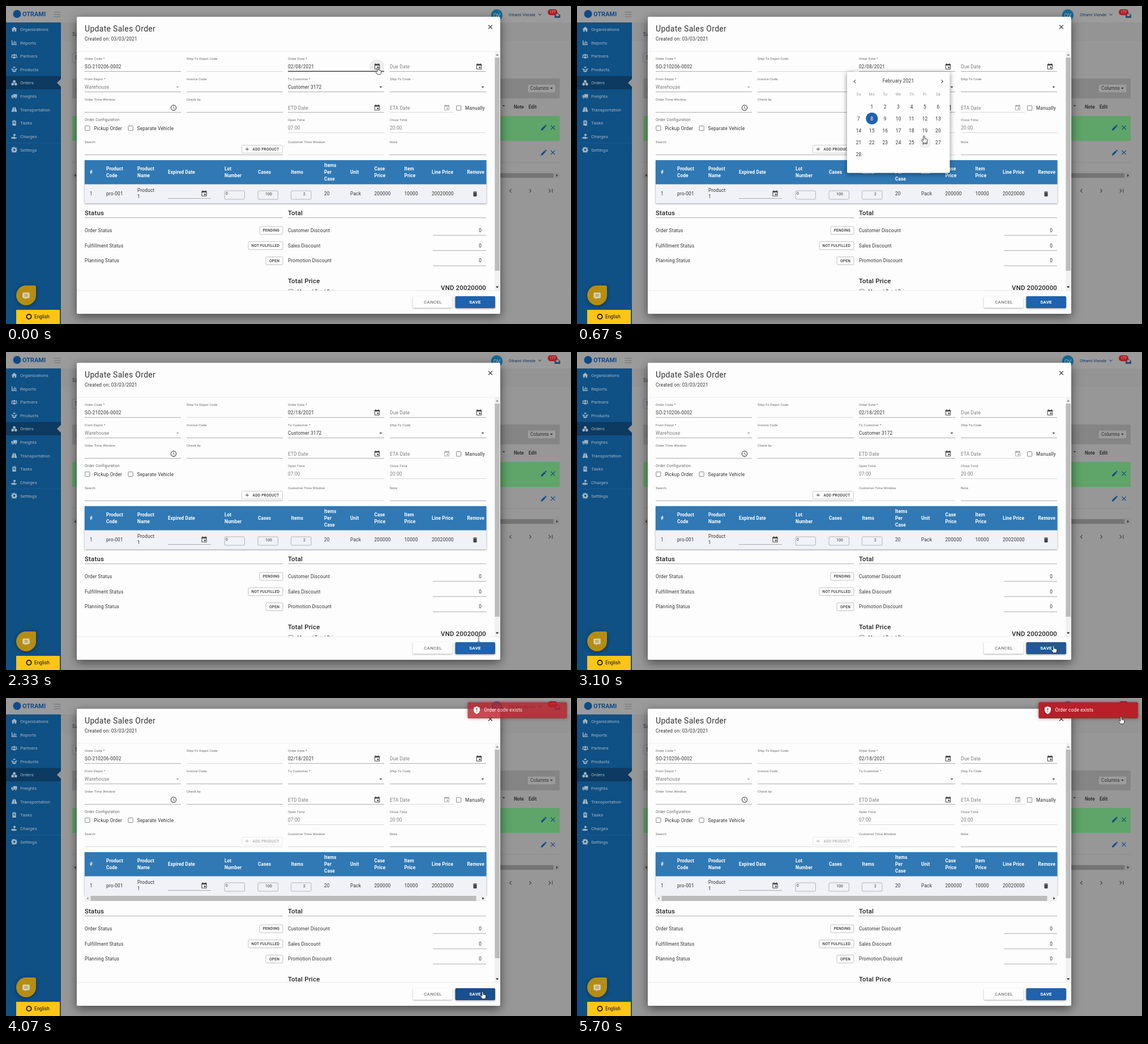
Write an HTML page that moves like this. It is 998 px wide and 561 px high and loops after 5.73 s.

```html
<!DOCTYPE html>
<html lang="en">
<head>
<meta charset="utf-8">
<title>Update Sales Order</title>
<style>
html, body { margin: 0; width: 100%; height: 100%; overflow: hidden; background: #999; }
svg { display: block; width: 998px; height: 561px; }
text { font-family: Roboto, sans-serif; font-size: 8.3px; letter-spacing: .2px; fill: #333; white-space: pre; }
.side text, .top text { letter-spacing: 0; }
.lb { font-size: 5.9px; letter-spacing: .15px; fill: #666; }
.sm { font-size: 6.7px; letter-spacing: .18px; fill: #666; }
.btn { font-size: 6.5px; letter-spacing: .3px; font-weight: 500; }
.th { font-size: 8.2px; letter-spacing: .12px; font-weight: 700; fill: #fff; }
.h { font-size: 11.4px; font-weight: 500; fill: #222; }
.gray { fill: #7c7c7c; }
.in { font-size: 6.8px; }
.big { font-size: 8px; letter-spacing: .25px; font-weight: 500; }
</style>
</head>
<body>
<svg id="stage" viewBox="0 0 998 561"></svg>
<script>
const LOOP = 5730;
const SHAPES = {
  event: 'M17 12h-5v5h5zM16 1v2H8V1H6v2H5a2 2 0 0 0-2 2v14a2 2 0 0 0 2 2h14a2 2 0 0 0 2-2V5a2 2 0 0 0-2-2h-1V1zm3 18H5V8h14z',
  clock: 'M12 2a10 10 0 1 0 0 20 10 10 0 0 0 0-20zm0 2.2a7.8 7.8 0 1 1 0 15.6 7.8 7.8 0 0 1 0-15.6zM11 7v6l5 3 .8-1.3-4.2-2.5V7z',
  bin: 'M6 19a2 2 0 0 0 2 2h8a2 2 0 0 0 2-2V7H6zM19 4h-3.5l-1-1h-5l-1 1H5v2h14z',
  pen: 'M3 17.25V21h3.75L17.8 9.94l-3.75-3.75zM20.7 7.04a1 1 0 0 0 0-1.41l-2.34-2.34a1 1 0 0 0-1.41 0l-1.83 1.83 3.75 3.75z',
  down: 'M7 10l5 5 5-5z',
  close: 'M19 6.4L17.6 5 12 10.6 6.4 5 5 6.4l5.6 5.6L5 17.6 6.4 19l5.6-5.6 5.6 5.6 1.4-1.4-5.6-5.6z',
  plus: 'M19 13h-6v6h-2v-6H5v-2h6V5h2v6h6z',
  left: 'M15.4 7.4L14 6l-6 6 6 6 1.4-1.4L10.8 12z',
  right: 'M8.6 16.6L13.2 12 8.6 7.4 10 6l6 6-6 6z',
  last: 'M5.6 7.4L10.2 12l-4.6 4.6L7 18l6-6-6-6zM16 6h2v12h-2z',
  chat: 'M5 3h14a3 3 0 0 1 3 3v10a3 3 0 0 1-3 3h-5l-5 3v-3H5a3 3 0 0 1-3-3V6a3 3 0 0 1 3-3zm2 5v2h10V8zm0 4v2h10v-2z',
  shield: 'M12 1L3 4.5V11c0 5.500 3.800 10 9 12 5.200-2 9-6.500 9-12V4.500zM10.800 6h2.500v7h-2.500zm0 9h2.500v2.500h-2.500z',
  home: 'M12 2L1 12h3v9h6v-6h4v6h6v-9h3z',
  chart: 'M2 3h3v15h17v3H2zM7 11h3v5H7zM12 6h3v10h-3zM17 9h3v7h-3z',
  people: 'M12 4a4 4 0 1 1 0 8 4 4 0 0 1 0-8zM4.500 6a3 3 0 1 1 0 6 3 3 0 0 1 0-6zm15 0a3 3 0 1 1 0 6 3 3 0 0 1 0-6zM6 21v-3c0-6 12-6 12 0v3zM0 18c0-5 3-5 5-4.500V18zm24 0c0-5-3-5-5-4.500V18z',
  box: 'M12 1L6 4l6 3 6-3zM1 8l10 4-2 4-8-4zM23 8l-10 4 2 4 8-4zM4 15l6 3 2-3 2 3 6-3v4l-8 4-8-4z',
  cubes: 'M12 1l5 3v6l-5 3-5-3V4zM6 11l5 3v6l-5 3-5-3v-6zM18 11l5 3v6l-5 3-5-3v-6z',
  truck: 'M8 4h15v13H8zM1 8h6v9H1zM6 15a3 3 0 1 1 0 6 3 3 0 0 1 0-6zm12 0a3 3 0 1 1 0 6 3 3 0 0 1 0-6z',
  road: 'M7 3h4v4h2V3h4l6 18H13v-5h-2v5H1zM11 9v4h2V9z',
  tasks: 'M5 3h14v19H5zM9 1h6v3H9zM8 8v2h8V8zm0 4v2h8v-2z',
  coin: 'M1 15h5l5-2h4v3h7v3l-9 3-7-1H1zM13 2a4.500 4.500 0 1 1 0 9 4.500 4.500 0 0 1 0-9z',
  gear: 'M10 1h4l.6 3 2.200 1 2.600-1.700 2.800 2.800L20.500 9l.8 2 2.700 1v3l-3 1-1 2 1.500 2.700-2.800 2.200L16 21l-2 2h-4l-2-2-3 1.500-2.600-2.300L4 17l-1-2-3-1v-4l3-1 1-2-1.500-2.700L5 2l3 2zm2 7a4 4 0 1 0 0 8 4 4 0 0 0 0-8z',
  mail: 'M1 10l11-8 11 8v12H1zm3 1l8 5 8-5-8-6z'
};

const text = (x, y, s, cls = '', more = '') => `<text x="${x}" y="${y}" class="${cls}" ${more}>${s}</text>`;
const rect = (x, y, w, h, fill, more = '') => `<rect x="${x}" y="${y}" width="${w}" height="${h}" fill="${fill}" ${more}/>`;
const line = (x1, x2, y, color = '#8c8c8c', w = .7) => rect(x1, y - w / 2, x2 - x1, w, color);
const disc = (x, y, r, fill, more = '') => `<circle cx="${x}" cy="${y}" r="${r}" fill="${fill}" ${more}/>`;
const path = (d, fill, more = '') => `<path d="${d}" fill="${fill}" ${more}/>`;
const icon = (name, x, y, size = 12.5, fill = '#444') =>
  path(SHAPES[name], fill, `fill-rule="evenodd" transform="translate(${x - size / 2} ${y - size / 2}) scale(${size / 24})"`);
const group = (id, body, more = '') => `<g id="${id}" ${more}>${body}</g>`;
const box = (x, y, w, h, color = '#aaa', r = 2) => rect(x, y, w, h, 'none', `rx="${r}" stroke="${color}" stroke-width=".7"`);
const END = 'text-anchor="end"', MID = 'text-anchor="middle"';

function page() {
  const nav = ['home Organizations', 'chart Reports', 'people Partners', 'box Products', 'cubes Orders', 'truck Freights',
    'road Transportation', 'tasks Tasks', 'coin Charges', 'gear Settings'];
  const pale = '#a3b4c2', blue = '#0e4a86';
  let s = rect(0, 0, 998, 561, '#949494') + rect(97, 62, 901, 499, '#979797') + rect(117, 128, 861, 35, '#858585')
    + text(117, 53, 'Sales Order') + box(117, 83, 60, 17, '#777') + text(122, 93.500, 'Search')
    + text(122, 148.500, '::') + rect(921, 138, 50, 15, '#9c9c9c', 'rx="2" stroke="#777" stroke-width=".7"')
    + text(926, 148.200, 'Columns', '', 'style="letter-spacing:0"') + icon('down', 963.500, 145, 11, '#222')
    + icon('down', 879, 176, 11, '#333') + text(897, 181.300, 'Note', '', 'font-weight="700" style="letter-spacing:0"')
    + text(923, 181.300, 'Edit', '', 'font-weight="700" style="letter-spacing:0"')
    + rect(117, 194, 861, 44, '#5fa468') + line(117, 978, 276, '#858585');
  for (const y of [214.500, 258.500]) s += icon('pen', 950, y, 13, blue) + icon('close', 966, y, 14, blue);
  s += rect(117, 294, 861, 10, '#919191') + rect(128, 295, 839, 8, '#747474') + path('M120.500 299l3-2.500v5z', '#333') + path('M975 299l-3-2.500v5z', '#333')
    + icon('left', 891, 326, 14) + icon('right', 926, 326, 14) + icon('last', 962, 326, 14);
  let side = rect(0, 29, 97, 532, '#0f5085') + rect(0, 123.500, 97, 23.500, '#0c3a60')
    + path('M97 128.500l-7 7 7 7z', '#949494') + line(0, 97, 241.800, '#2a6698', .5);
  nav.forEach((entry, i) => {
    const [ic, name] = entry.split(' '), y = 41 + i * 23.620;
    side += icon(ic, 14.500, y, 11, pale) + text(25, y + 3, name, '', `style="font-size:8.1px;fill:${pale}"`);
  });
  let top = rect(0, 0, 998, 29, '#9b9b9b') + disc(19.500, 14, 7, blue)
    + text(29, 18, 'OTRAMI', '', `style="font-size:11px;font-weight:700;fill:${blue}"`);
  for (const y of [11, 15, 19]) top += line(84.500, 96.500, y, '#666', .8);
  top += disc(867, 16, 10.200, '#166a94') + text(867, 19.500, 'OV', '', `${MID} style="font-size:9.500px;fill:#b4c4cc"`)
    + text(888, 17.600, 'Otrami Vlende', '', 'style="font-size:7.500px;fill:#16385c"') + path('M940.500 13.500l2.500 3 2.500-3', 'none', 'stroke="#16385c"')
    + icon('mail', 974, 16.500, 11, '#2d4d70') + rect(957, 5.800, 17, 10.500, '#ab1c22', 'rx="5"')
    + text(965.500, 13.300, '177', '', `${MID} style="font-size:6.300px;fill:#d8c8c8"`);
  return s + group('', side, 'class="side"') + group('', top, 'class="top"')
    + path('M35.500 493H50q3 0 3 3v14.500a17.500 17.500 0 1 1-17.500-17.500z', '#b58d12', 'style="filter:drop-shadow(0 1px 3px #0006)"')
    + icon('chat', 35.500, 511, 15, '#d6d0bc') + rect(18, 536, 77, 25, '#fdc515')
    + disc(40.500, 548, 4.100, 'none', 'stroke="#111" stroke-width="1.800"')
    + text(50, 551.200, 'English', '', 'style="fill:#111;letter-spacing:0"');
}

function field(x1, x2, y, label, value = '', cls = '', color) {
  return text(x1, y - 20.500, label, 'lb') + text(x1, y - 5.500, value, cls) + line(x1, x2, y, color);
}
const check = (x, y, label) => box(x, y - 4, 8.200, 8.200, '#555', 1) + text(x + 15.500, y + 3, label);

function form() {
  const C = [[139, 309], [319, 489], [498, 668], [678, 848]], soft = '#ccc';
  const f = (c, ...rest) => field(...C[c], ...rest);
  return f(0, 115.500, 'Order Code *', 'SO-210206-0002') + f(1, 115.500, 'Ship-To Depot Code', '', '', soft)
    + text(498, 95, 'Order Date *', 'lb') + line(498, 668, 115.500) + group('ripple', disc(655, 107, 13, '#ededed'))
    + group('focus', line(498, 668, 115.200, '#222', 1.200)) + text(498, 110, '', '', 'id="date"') + icon('event', 655.500, 107)
    + f(3, 115.500, '', '') + text(678, 110, 'Due Date', 'gray') + icon('event', 835.500, 107)
    + f(0, 151.500, 'From Depot *', 'Warehouse', 'gray') + icon('down', 303, 143, 12, '#aaa') + f(1, 151.500, 'Invoice Code')
    + f(2, 151.500, 'To Customer *') + group('customer', text(498, 146, 'Customer 3172')) + icon('down', 662, 143, 12)
    + f(3, 151.500, 'Ship-To Code') + icon('down', 842, 143, 12)
    + f(0, 187.500, 'Order Time Window') + icon('clock', 296, 179.500) + f(1, 187.500, 'Check by')
    + f(2, 187.500, '') + text(498, 182.500, 'ETD Date', 'gray') + icon('event', 655.500, 179.500)
    + line(678, 791, 187.500, soft) + text(678, 182.500, 'ETA Date', 'gray') + icon('event', 778.500, 179.500, 12, '#aaa') + check(795.500, 179.800, 'Manually')
    + text(139, 203.300, 'Order Configuration', 'sm') + check(139.700, 215.500, 'Pickup Order') + check(216, 215.500, 'Separate Vehicle')
    + f(2, 223.500, 'Open Time', '07:00', 'gray', soft) + f(3, 223.500, 'Close Time', '20:00', 'gray', soft)
    + text(139, 242.300, 'Search', 'lb') + group('searchLine', line(139, 489, 262.500))
    + text(498, 242.300, 'Customer Time Window', 'lb') + line(498, 668, 262.500, soft)
    + text(678, 242.300, 'Note', 'lb') + line(678, 848, 262.500)
    + group('add', box(416.500, 245.500, 72, 14, '#bbb') + icon('plus', 426, 252.500, 10) + text(435.500, 254.800, 'ADD PRODUCT', 'btn'));
}

function table() {
  const heads = [[148, '#'], [177, 'Product', 'Code'], [232, 'Product', 'Name'], [286, 'Expired Date'], [386, 'Lot', 'Number'],
    [445, 'Cases'], [503.500, 'Items'], [562, 'Items', 'Per', 'Case'], [608, 'Unit'], [650.500, 'Case', 'Price'],
    [703.500, 'Item', 'Price'], [752, 'Line Price'], [814.500, 'Remove']];
  const cells = [[148, '1'], [177, 'pro-001'], [562, '20'], [608, 'Pack'], [650.500, '200000'], [703.500, '10000'], [752, '20020000']];
  let s = rect(139, 272, 709.500, 76, '#f1f2f7', 'style="filter:drop-shadow(0 1px 1.500px #0006)"') + rect(139, 272, 709.500, 42.500, '#3079b5');
  for (const [x, ...rows] of heads) rows.forEach((r, i) => s += text(x, 296.300 + (i - (rows.length - 1) / 2) * 12, r, 'th'));
  for (const [x, v] of cells) s += text(x, 333.800, v);
  s += text(232, 327.800, 'Product') + text(232, 339.300, '1') + line(286, 362, 339.500) + icon('event', 350, 331);
  for (const x of [386, 445, 503.500]) s += box(x, 326, 35.500, 15, '#999');
  return s + text(388, 333.300, '0', 'in') + text(470, 333.500, '100', 'in', END) + text(529, 333.500, '2', 'in', END) + icon('bin', 828.500, 331.500, 12)
    + group('hbar', rect(139, 348, 709, 11, '#f1f1f1') + rect(149.500, 349, 681, 9, '#bcbcbc')
      + path('M142.500 353.500l3-2.500v5z', '#999') + path('M844.500 353.500l-3-2.500v5z', '#222'));
}

function summary() {
  let s = text(139, 369.300, 'Status', 'h') + text(498, 369.300, 'Total', 'h') + line(139, 489, 373.700) + line(498, 848, 373.700);
  [['Order Status', 'PENDING', 41, 'Customer Discount'], ['Fulfillment Status', 'NOT FULFILLED', 61, 'Sales Discount'],
    ['Planning Status', 'OPEN', 30, 'Promotion Discount']].forEach(([a, chip, w, b], i) => {
    const y = 396 + i * 26.750;
    s += text(139, y + 2.800, a) + box(489 - w, y - 7, w, 14, '#aaa') + text(489 - w / 2, y + 2.300, chip, 'btn', MID)
      + text(498, y + 2.800, b) + text(840, y + 2.800, '0', '', END) + line(754, 848, y + 8.700);
  });
  return s + text(498, 488.800, 'Total Price', 'h') + text(848, 501.300, 'VND 20020000', 'h', END) + check(499, 504, 'Manual Total Price');
}

function modal() {
  return rect(125, 19, 748, 524, '#fdfdfd', 'rx="2" style="filter:drop-shadow(0 5px 9px #0008)"')
    + text(139, 45, 'Update Sales Order', '', 'style="font-size:14px;letter-spacing:.3px"') + text(139, 61.300, 'Created on: 03/03/2021')
    + icon('close', 855.500, 37, 13, '#222') + line(125, 873, 80, '#e4e4e4') + form() + table()
    + group('', group('summary', summary()), 'clip-path="url(#body)"')
    + rect(863, 80.500, 9.500, 421.500, '#f1f1f1') + rect(863.500, 91, 8.500, 376, '#bcbcbc', 'id="thumb"')
    + path('M865 87.500l2.700-3 2.700 3z', '#888') + path('M865 494.500l2.700 3 2.700-3z', '#222')
    + rect(125, 502, 748, 30, '#fdfdfd') + line(125, 873, 502, '#e0e0e0')
    + rect(718.500, 512, 70, 20.500, '#fdfdfd', 'rx="2" style="filter:drop-shadow(0 1px 1px #0005)"') + text(754, 525.300, 'CANCEL', 'big gray', MID)
    + rect(793.500, 512, 70.500, 21, '#1f62ad', 'id="save" rx="2" style="filter:drop-shadow(0 1px 1.500px #0006)"')
    + text(828.500, 525.300, 'SAVE', 'big', `${MID} style="fill:#fff;font-weight:700"`);
}

const dayX = c => 497.500 + c * 23.400, dayY = r => 177.500 + r * 21;
function calendar() {
  let s = rect(477, 116, 181.500, 178.500, '#fefefe', 'rx="2" style="filter:drop-shadow(0 2px 4px #0007)"')
    + text(567.500, 134.800, 'February 2021', '', MID) + icon('left', 490.500, 133, 12.500) + icon('right', 645, 133, 12.500)
    + disc(0, 0, 10.500, '#efefef', 'id="hover"') + disc(0, 0, 10.600, '#1f62ad', 'id="picked"');
  'Su Mo Tu We Th Fr Sa'.split(' ').forEach((d, i) => s += text(dayX(i), 158, d, '', `${MID} style="font-size:6.700px;fill:#999"`));
  for (let d = 1; d <= 28; d++) s += text(dayX(d % 7), dayY(Math.floor(d / 7)) + 3, d, '', `${MID} id="d${d}"`);
  return s;
}

const toast = () => rect(815.500, 7.500, 175.500, 28.500, '#b81f29', 'rx="2" style="filter:drop-shadow(0 0 3px #0006)"')
  + icon('shield', 831.500, 21.500, 14.500, '#fff') + text(844.500, 24, 'Order code exists', '', 'style="fill:#fff"');

const OUTLINE = 'stroke="#111" stroke-width=".8" stroke-linejoin="round"';
const cursors = () => group('hand', path('M-1.200 1.300C-1.200-.4 1-.4 1 1.300V4.800l3.500.9c1 .3 1.400.9 1.300 1.900l-.5 3.200-.8 2H-.7L-3.900 8.400c-.8-1.100.3-2 1.300-1.300l1.400 1z', '#fff', OUTLINE))
  + group('arrow', path('M0 0V11.500L2.700 9l1.800 4 1.700-.8L4.400 8.300H8z', '#fff', OUTLINE))
  + group('beam', path('M-2.500-5h2l.5.5.5-.5h2M0-4.500v9M-2.500 5h2l.5-.5.5.5h2', 'none', 'stroke="#333" stroke-width=".9"'));

const stage = document.getElementById('stage');
stage.innerHTML = '<clipPath id="body"><rect x="125" y="80" width="738" height="422"/></clipPath>'
  + page() + modal() + group('calendar', calendar()) + group('toast', toast()) + cursors();
const $ = id => document.getElementById(id);

// Each step: time, then the values reached at that time.
const MOVES = [[0, 657, 108], [380, 657, 108], [660, 613, 229], [740, 613, 229], [960, 591, 216], [1260, 591, 216],
  [1800, 704, 407], [1930, 719, 407], [2120, 719, 407], [2320, 835, 506], [2350, 835, 506], [2520, 845, 525],
  [2690, 842, 518], [4280, 842, 518], [4820, 847, 9], [4990, 847, 9], [5400, 961, 33]];
const KINDS = [[0, 'hand'], [1330, 'arrow'], [2240, 'beam'], [2400, 'hand'], [4400, 'arrow'], [4780, 'hand']];
const POPUP = [[120, 0], [360, 1], [1130, 1], [1300, 0]];
const TOAST = [[3410, 0], [3760, .8], [4790, .8], [4840, 1]];
const SAVE = [[2420, 31, 98, 173], [2760, 24, 79, 141], [2980, 24, 79, 141], [3200, 43, 95, 151], [3550, 43, 95, 151],
  [3850, 24, 79, 141], [4330, 24, 79, 141], [4560, 31, 98, 173]];
const PICK = 1100, RESET = 3130;

const ease = k => k * k * (3 - 2 * k);
function at(track, t, curve = k => k) {
  const i = track.findIndex(s => s[0] > t);
  if (i === 0) return track[0].slice(1);
  if (i < 0) return track[track.length - 1].slice(1);
  const a = track[i - 1], b = track[i], k = curve((t - a[0]) / (b[0] - a[0]));
  return a.slice(1).map((v, j) => v + (b[j + 1] - v) * k);
}
const show = (id, on) => $(id).style.opacity = +on;
const place = (id, x, y) => $(id).setAttribute('transform', `translate(${x} ${y})`);

function draw(t) {
  const [x, y] = at(MOVES, t, ease), kind = KINDS.filter(k => k[0] <= t).pop()[1];
  for (const k of ['hand', 'arrow', 'beam']) show(k, k === kind);
  place(kind, x, y);

  const [open] = at(POPUP, t, ease), day = t < PICK ? 8 : 18, grow = .75 + .25 * open;
  show('calendar', open);
  $('calendar').setAttribute('transform', `translate(567 205) scale(${grow}) translate(-567 -205)`);
  place('picked', dayX(day % 7), dayY(Math.floor(day / 7)));
  for (const d of [8, 18]) $('d' + d).style.fill = d === day ? '#fff' : '#333';
  const col = Math.round((x - dayX(0)) / 23.400), row = Math.round((y + 1 - dayY(0)) / 21);
  place('hover', dayX(col), dayY(row));
  show('hover', row >= 0 && row < 4 && col >= 0 && col < 7);

  show('ripple', t < 400);
  show('focus', t < 200);
  $('date').textContent = t < PICK ? '02/08/2021' : '02/18/2021';

  const reset = t >= RESET;
  show('customer', !reset);
  show('hbar', reset);
  $('add').style.opacity = $('searchLine').style.opacity = reset ? .4 : 1;
  place('summary', 0, reset ? 11 : 0);
  $('thumb').setAttribute('height', reset ? 368 : 376);
  $('save').setAttribute('fill', `rgb(${at(SAVE, t).map(Math.round)})`);
  show('toast', at(TOAST, t)[0]);
}

const start = performance.now();
function tick() {
  draw((performance.now() - start) % LOOP);
  requestAnimationFrame(tick);
}
draw(0);
requestAnimationFrame(tick);
</script>
</body>
</html>
```
